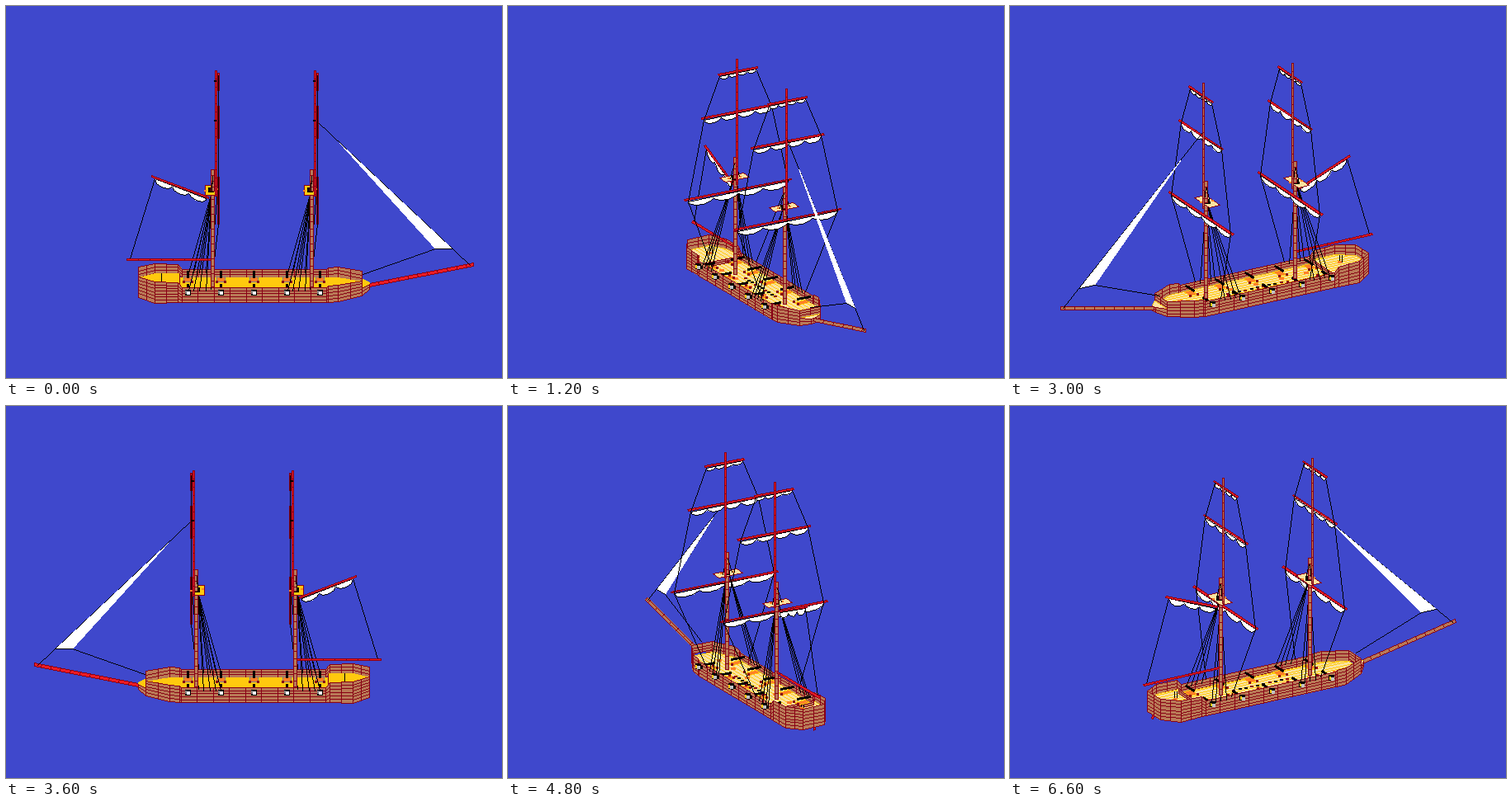
These frames come from a looping animation (601 px wide and 451 px high, 7200 ms). An HTML page with a canvas:

```html
<!DOCTYPE html>
<html lang="en">
<head>
<meta charset="utf-8">
<title>Turning brig</title>
<style>
html, body { margin: 0; width: 100%; height: 100%; overflow: hidden; background: #3f48cc; }
canvas { display: block; }
</style>
</head>
<body>
<canvas id="stage" width="601" height="451"></canvas>
<script>
const ctx = document.getElementById('stage').getContext('2d');

const STEP = 600, TURNS = 12;
const SEA = '#3f48cc', WOOD = '#b97a57', SEAM = '#880015', RED = '#ed1c24';
const GOLD = '#ffc90e', CREAM = '#fbe3a0', ORANGE = '#ff7f27', BLACK = '#000', WHITE = '#fff';

// Screen directions of the hull's length and width for each twelfth of a turn
const axis = (a, b, c, d) => {
  const x = [1, a, b, 0, -b, -a], y = [0, c, d, .4, d, c];
  const neg = n => -n;
  return { x: [...x, ...x.map(neg)], y: [...y, ...y.map(neg)] };
};
const LONG = axis(.9, .5, .2, .3), WIDE = axis(.9, .54, .18, .36);
let turn = 0, ahead = { x: 1, y: 0 }, beam = { x: 0, y: .4 };

function face(n) {
  const side = (n + 3) % TURNS;
  turn = n;
  ahead = { x: LONG.x[n], y: LONG.y[n] };
  beam = { x: WIDE.x[side], y: WIDE.y[side] };
}

// x: towards the bow, y: towards starboard, v: height on screen, downwards
const at = (x, y, v) => [300 + x * ahead.x + y * beam.x, v + x * ahead.y + y * beam.y];
const mix = (a, b, t) => a.map((n, i) => n + (b[i] - n) * t);
const broadside = () => turn % 6 === 0;

function box(x, y, w, h, color) {
  ctx.fillStyle = color;
  ctx.fillRect(Math.round(x - w / 2), Math.round(y - h / 2), w, h);
}

// Hard-edged one pixel line
function line(a, b, color = BLACK) {
  let [x, y] = a.map(Math.round);
  const [ex, ey] = b.map(Math.round);
  const w = Math.abs(ex - x), h = -Math.abs(ey - y);
  const sx = x < ex ? 1 : -1, sy = y < ey ? 1 : -1;
  let err = w + h;
  ctx.fillStyle = color;
  for (;;) {
    ctx.fillRect(x, y, 1, 1);
    if (x === ex && y === ey) return;
    const e = 2 * err;
    if (e >= h) { err += h; x += sx; }
    if (e <= w) { err += w; y += sy; }
  }
}

const rope = (...pts) => pts.slice(1).forEach((p, i) => line(at(...pts[i]), at(...p)));
const outline = (pts, color) => pts.forEach((p, i) => line(p, pts[(i + 1) % pts.length], color));

function poly(pts, fill, edge) {
  const ys = pts.map(p => p[1]);
  ctx.fillStyle = fill;
  for (let y = Math.floor(Math.min(...ys)); y <= Math.max(...ys); y++) {
    const cuts = [];
    pts.forEach((a, i) => {
      const b = pts[(i + 1) % pts.length];
      if (a[1] <= y !== b[1] <= y) cuts.push(a[0] + (b[0] - a[0]) * (y - a[1]) / (b[1] - a[1]));
    });
    cuts.sort((a, b) => a - b);
    for (let i = 0; i + 1 < cuts.length; i += 2) {
      const l = Math.round(cuts[i]);
      ctx.fillRect(l, y, Math.round(cuts[i + 1]) - l + 1, 1);
    }
  }
  if (edge) outline(pts, edge);
}

// Beam between two screen points, with joints along it
function spar(a, b, w, fill, edge, gap = 12) {
  const vx = b[0] - a[0], vy = b[1] - a[1], len = Math.hypot(vx, vy) || 1;
  const ox = -vy / len * w / 2, oy = vx / len * w / 2;
  const l = p => [p[0] + ox, p[1] + oy], r = p => [p[0] - ox, p[1] - oy];
  poly([l(a), l(b), r(b), r(a)], fill, edge);
  for (let d = gap; d < len; d += gap) {
    const p = mix(a, b, d / len);
    line(l(p), r(p), edge);
  }
}

// Furled sail hanging in lumps below the line a-b
function furled(a, b, lumps, depth) {
  const pts = [a];
  for (let i = 0; i < lumps; i++) {
    for (const [t, d] of [[.12, .7], [.4, 1], [.75, .9], [1, .3]]) {
      const p = mix(a, b, (i + t) / lumps);
      pts.push([p[0], p[1] + d * depth]);
    }
  }
  pts.push(b);
  poly(pts, WHITE, BLACK);
}

// Half of the hull from stern to bow: x, y, rail, keel
const SIDE = [
  [-140, 14, 322, 347], [-120, 27, 323, 349], [-92, 28, 324, 348], [-87, 28, 330, 348],
  [88, 28, 330, 348], [90, 28, 328, 348], [102, 28, 327, 347], [131, 14, 327, 345],
  [131, 14, 336, 345], [140, 3, 336, 342]
];
const flip = ([x, y, ...h]) => [x, -y, ...h];
const RING = [...SIDE, ...SIDE.map(flip).reverse()];

function panel(a, b, inner) {
  const low = p => inner ? Math.min(p[3], p[0] < -88 ? 335 : 340) : p[3];
  const p = (s, t) => {
    const q = mix(a, b, s);
    const bottom = low(a) + (low(b) - low(a)) * s;
    return at(q[0], q[1], q[2] + (bottom - q[2]) * t);
  };
  poly([p(0, 0), p(1, 0), p(1, 1), p(0, 1)], WOOD, SEAM);
  const bands = Math.max(2, Math.round((low(a) - a[2]) / 4));
  for (let i = 1; i < bands; i++) line(p(0, i / bands), p(1, i / bands), SEAM);
  const joints = Math.ceil(Math.hypot(b[0] - a[0], b[1] - a[1]) / 20);
  for (let i = 1; i < joints; i++) line(p(i / joints, 0), p(i / joints, 1), SEAM);
}

function sides(near) {
  RING.forEach((a, i) => {
    const b = RING[(i + 1) % RING.length];
    const front = at(...b)[0] > at(...a)[0];
    if (front === near) panel(a, b, !near);
  });
}

function floor(half, v) {
  const pts = [...half, ...half.map(flip).reverse()];
  poly(pts.map(([x, y]) => at(x, y, v)), broadside() ? GOLD : CREAM, GOLD);
}

const beak = () => floor([[131, 14], [140, 3]], 336);
const bulwark = () => panel([131, 14, 327, 337], [131, -14, 327, 337], false);

function deck() {
  floor([[-140, 14], [-120, 27], [-90, 28]], 335);
  floor([[-90, 28], [102, 28], [131, 14]], 340);
  for (let y = -24; y <= 24; y += 6) {
    const in14 = Math.max(0, Math.abs(y) - 14);
    line(at(-140 + in14 * 1.5, y, 335), at(-90, y, 335), GOLD);
    line(at(-90, y, 340), at(131 - in14 * 2, y, 340), GOLD);
  }
  panel([-90, -28, 335, 340], [-90, 28, 335, 340], false);
  if (!broadside()) {
    for (let x = -30; x <= 46; x += 8) box(...at(x, -3, 340), 4, 2, x % 3 ? BLACK : SEAM);
    for (let x = -70; x <= 100; x += 34) box(...at(x, 7, 340), 6, 3, ORANGE);
  }
  // Steering wheel
  const [wx, wy] = at(-111, 0, 328);
  line([wx - 1, wy - 4], [wx - 1, wy + 5]);
  if (!broadside()) {
    line([wx + 2, wy - 4], [wx + 2, wy + 4]);
    box(wx, wy + 5, 5, 3, ORANGE);
  }
  const [first, last] = ahead.y > 0 ? [bulwark, beak] : [beak, bulwark];
  first();
  last();
}

const GUNS = [-80, -40, 0, 40, 80];

function gun(x, s) {
  const foot = [[-5, 10], [5, 10], [5, 25], [-5, 25]].map(([d, y]) => at(x + d, y * s, 338));
  poly(foot, ORANGE, broadside() ? '#7f7f7f' : GOLD);
  box(...foot[0], 3, 3, SEAM);
  box(...foot[1], 3, 3, SEAM);
  spar(at(x, 11 * s, 333), at(x, 29 * s, 333), 2, BLACK, BLACK);
}

function muzzle(x, s) {
  spar(at(x, 28 * s, 335), at(x, 34 * s, 335), 3, BLACK, BLACK);
  const [mx, my] = at(x, 33 * s, 334);
  box(mx, my, 7, 7, BLACK);
  box(mx - 2, my, 2, 4, broadside() ? '#7f7f7f' : GOLD);
  box(mx + 1, my + 1, 4, 4, broadside() ? WHITE : '#c3c3c3');
}

function hull() {
  sides(false);
  deck();
  const far = beam.y > 0 ? -1 : 1;
  for (const s of [far, -far]) GUNS.forEach(x => gun(x, s));
  if (!broadside()) spar(at(-140, 0, 344), at(-142, 0, 350), 2, RED, SEAM);
  sides(true);
  for (const s of [-1, 1]) if (s * beam.y >= 0) GUNS.forEach(x => muzzle(x, s));
}

// Height, half length and sail depth of the yards
const YARDS = [[91.5, 26.5, 4], [140.5, 49, 6], [235.5, 72, 7]];

function yards(x) {
  for (const [v, half, depth] of YARDS) {
    furled(at(x, -half * .93, v + 2), at(x, half * .93, v + 2), 4, depth);
    spar(at(x, -half, v), at(x, half, v), 2, RED, SEAM, 10);
  }
  for (const s of [-1, 1]) {
    rope(...YARDS.map(([v, half]) => [x, half * .93 * s, v + 2]), [x - 9, 29 * s, 331]);
  }
}

function mast(x) {
  const slim = turn % 6 === 1 || turn % 6 === 5;
  const lower = (top, foot, gap) =>
    spar(at(x - 3.5, 0, top), at(x - 3.5, 0, foot), 4, WOOD, SEAM, gap);
  const sails = () => yards(x + 3);
  if (ahead.y <= 0) sails();
  for (const s of [-1, 1]) {
    for (const d of [-33, -27, -20, -12]) rope([x - 5, 2 * s, 226], [x + d, 28 * s, 334]);
  }
  lower(198, 340, 9);
  if (ahead.y > 0) sails();
  const top = [[-13, -16], [2, -16], [2, 16], [-13, 16]].map(([d, y]) => at(x + d, y, 223));
  poly(top, broadside() ? GOLD : CREAM, SEAM);
  const [px, py] = at(x - 5, 0, 223);
  box(px, py, 7, 6, BLACK);
  box(px - 7, py + 1, 3, 2, ORANGE);
  box(px + 7, py - 1, 3, 2, ORANGE);
  lower(198, 224, 7);
  for (const s of [-1, 1]) rope([x - 4, s, 206], [x - 5, 6 * s, 223]);
  spar(at(x, 0, 78), at(x, 0, 230), 2, slim ? WOOD : RED, SEAM, 10);
  if (broadside()) for (const v of [91, 139]) box(...at(x, 0, v), 3, 2, BLACK);
}

function spanker() {
  rope([-120, 0, 209], [-150, 0, 306]);
  furled(at(-120, 0, 209), at(-58, 0, 233), 3, 7);
  spar(at(-124, 0, 206), at(-55, 0, 232), 2, RED, SEAM, 10);
  spar(at(-154, 0, 307), at(-52, 0, 307), 2, RED, SEAM, 14);
}

function jib() {
  const sail = [at(104, 0, 166), at(220, 0, 294), at(240, 0, 294)];
  rope([76, 0, 139], [262, 0, 314]);
  rope([220, 0, 294], [132, 0, 325]);
  outline(sail, BLACK);
  poly(sail, WHITE);
  line(sail[1], sail[2]);
}

function bowsprit() {
  spar(at(140, 0, 338), at(266, 0, 313), 4, broadside() ? RED : WOOD, SEAM, 12);
}

function draw() {
  ctx.fillStyle = SEA;
  ctx.fillRect(0, 0, 601, 451);
  const aft = () => mast(-46.5), fore = () => mast(73.5);
  const order = ahead.y > 0
    ? [hull, bowsprit, spanker, aft, fore, jib]
    : [bowsprit, hull, jib, fore, aft, spanker];
  order.forEach(part => part());
}

let shown = -1;
function tick() {
  const n = Math.floor(performance.now() / STEP) % TURNS;
  if (n !== shown) {
    shown = n;
    face(n);
    draw();
  }
  requestAnimationFrame(tick);
}
tick();
</script>
</body>
</html>
```
